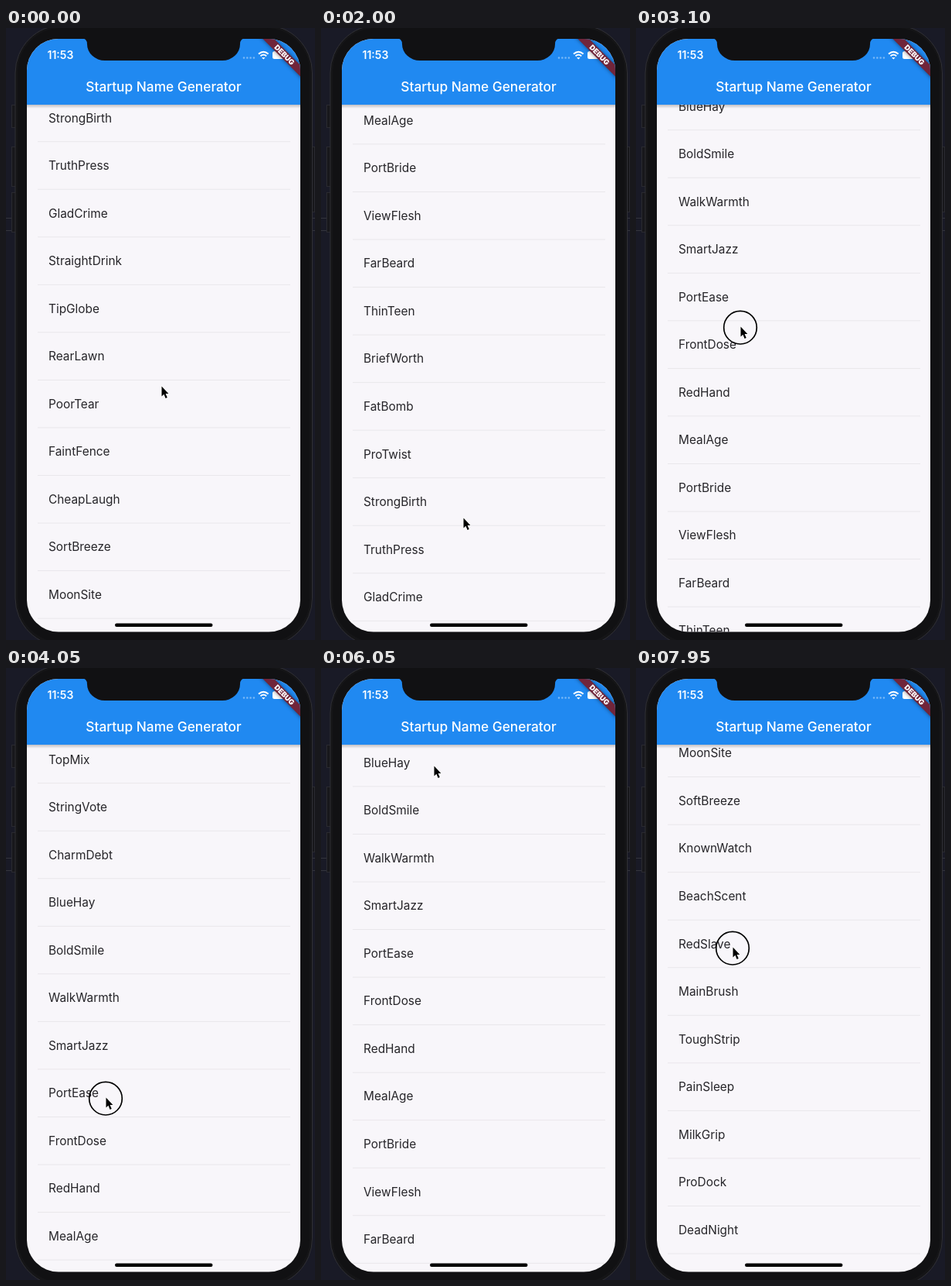
An HTML page for the animation above (8 s loop, 400 by 790 pixels).

```html
<!DOCTYPE html>
<html lang="en">
<head>
<meta charset="utf-8">
<title>Startup Name Generator</title>
<style>
  html, body { margin: 0; width: 100%; height: 100%; overflow: hidden; background: #191a26; }
  svg { display: block; width: 400px; height: 790px; font-family: Inter, Roboto, sans-serif; }
  #rows text { font-size: 15.4px; fill: #262529; }
  #rows path { stroke: #e9e7eb; }
</style>
</head>
<body>
<svg viewBox="0 0 400 790">
  <defs>
    <clipPath id="screen"><rect x="27" y="14" width="354" height="765.5" rx="41"/></clipPath>
    <linearGradient id="shade" x2="0" y2="1">
      <stop stop-color="#000" stop-opacity=".22"/>
      <stop offset="1" stop-color="#000" stop-opacity="0"/>
    </linearGradient>
    <filter id="blur" x="-30%" y="-100%" width="160%" height="300%"><feGaussianBlur stdDeviation="2.5"/></filter>
  </defs>

  <!-- phone body -->
  <path d="M0 245.5H400M0 261.5H400" stroke="#34353d"/>
  <g fill="#17171b" stroke="#2a2a30">
    <rect x="7.5" y="99.5" width="8" height="29"/>
    <rect x="7.5" y="153.5" width="8" height="51"/>
    <rect x="7.5" y="212.5" width="8" height="51"/>
    <rect x="392" y="153.5" width="7.5" height="84"/>
  </g>
  <rect x="12" y="-4" width="384.5" height="802" rx="62" fill="#151517" stroke="#303035"/>
  <rect x="15.5" y="0" width="377.5" height="793" rx="56" fill="#111113"/>

  <g clip-path="url(#screen)">
    <rect x="27" y="14" width="354" height="766" fill="#f8f6fa"/>
    <g id="rows"></g>
    <rect x="27" y="99" width="354" height="5" fill="url(#shade)"/>
    <rect x="27" y="14" width="354" height="85" fill="#2089f1"/>
    <text x="204" y="81.5" text-anchor="middle" font-size="17.3" font-weight="500" fill="#fff">Startup Name Generator</text>
    <text x="53.5" y="40" font-size="14" font-weight="600" fill="#fff">11:53</text>
    <path d="M308 38.5h15" stroke="#fff" stroke-opacity=".4" stroke-width="2.6" stroke-linecap="round" stroke-dasharray="0 4.3"/>
    <g fill="none" stroke="#fff" stroke-width="2">
      <path d="M327 33.5q6.3-5.6 12.6 0M329.5 36.2q3.8-3.3 7.6 0"/>
      <path d="M331 38l2.3 2.4 2.3-2.4z" fill="#fff" stroke="none"/>
    </g>
    <rect x="345" y="30" width="19" height="10" rx="2.5" fill="#fff"/>
    <g transform="translate(381 14) rotate(45)">
      <rect x="-60" y="24" width="120" height="10.3" filter="url(#blur)" opacity=".5"/>
      <rect x="-60" y="24" width="120" height="10.3" fill="#71253a"/>
      <text y="32.4" text-anchor="middle" font-size="9.3" font-weight="900" fill="#fff">DEBUG</text>
    </g>
    <rect x="141" y="768.5" width="126.5" height="4.5" rx="2.25" fill="#050505"/>
  </g>
  <path d="M97 13q8 0 8 8a23 21 0 0 0 23 21h152a23 21 0 0 0 23-21q0-8 8-8z" fill="#111113"/>

  <g id="pointer">
    <circle id="ring" cy="1.7" r="21.3" fill="none" stroke="#000" stroke-width="1.7"/>
    <path d="M.5 .5V13.5L3.4 10.8 5.6 16 7.8 15 5.6 10H9.4z" stroke="#fff" stroke-width="1.6" stroke-linejoin="round" paint-order="stroke"/>
  </g>
</svg>
<script>
const names = `TopMix StringVote CharmDebt BlueHay BoldSmile WalkWarmth SmartJazz PortEase FrontDose
RedHand MealAge PortBride ViewFlesh FarBeard ThinTeen BriefWorth FatBomb ProTwist StrongBirth TruthPress
GladCrime StraightDrink TipGlobe RearLawn PoorTear FaintFence CheapLaugh SortBreeze MoonSite SoftBreeze
KnownWatch BeachScent RedSlave MainBrush ToughStrip PainSleep MilkGrip ProDock DeadNight`.split(/\s+/);
const LOOP = 8000, STEP = 50, PITCH = 61.54;
const $ = id => document.getElementById(id);

$('rows').innerHTML = names.map((name, i) => {
  const y = i * PITCH;
  return `<text x="55" y="${y + 5.5}">${name}</text><path d="M41 ${y + 30.7}H368"/>`;
}).join('');

const linear = p => p;
const smooth = p => p * p * (3 - 2 * p);
const speedUp = p => p * p;
// Friction of a flung list: speed falls to 13.5% every second.
const fling = (p, ms) => (1 - .135 ** (p * ms / 1000)) / (1 - .135 ** (ms / 1000));

// Keys are [time, value, easing used to arrive there].
function track(keys, t) {
  const next = keys.findIndex(k => k[0] > t);
  if (next < 0) return keys[keys.length - 1][1];
  if (!next) return keys[0][1];
  const [t0, v0] = keys[next - 1], [t1, v1, ease = linear] = keys[next];
  return v0 + (v1 - v0) * ease((t - t0) / (t1 - t0), t1 - t0);
}

const scroll = [
  [0, 991.7], [1650, 991.7], [1700, 987], [1900, 599], [3100, 83.6, fling], [3150, 83.6],
  [3900, -118, smooth], [5900, -118], [5950, -82], [6000, -10], [6050, 62.4],
  [6550, 517, fling], [6750, 700, speedUp], [7650, 1613.2, fling]
];
const pointerX = [
  [0, 201], [400, 203, smooth], [1650, 190, smooth], [1900, 184], [2050, 184],
  [3000, 135, smooth], [3150, 135], [3900, 129, smooth], [4250, 129], [5600, 138, smooth],
  [6050, 146], [6500, 125, smooth], [6750, 121], [7600, 125, smooth]
];
const pointerY = [
  [0, 462], [400, 490, smooth], [1500, 231, smooth], [1650, 231], [1700, 236], [1900, 622],
  [2000, 632], [2950, 385, smooth], [3150, 385], [3900, 554, smooth], [4250, 554],
  [5600, 306, smooth], [5900, 306], [5950, 270], [6000, 198], [6050, 126], [6120, 112],
  [6500, 392, smooth], [6550, 392], [6750, 209, speedUp], [6830, 160], [7550, 356, smooth],
  [7650, 356], [7800, 360, smooth]
];
const presses = [[1600, 1900], [3050, 4150], [5750, 6020], [6520, 6740], [7640, 8000]];

function draw() {
  const t = Math.floor(performance.now() % LOOP / STEP) * STEP;
  $('rows').setAttribute('transform', `translate(0 ${-track(scroll, t)})`);
  $('pointer').setAttribute('transform', `translate(${track(pointerX, t)} ${track(pointerY, t)})`);
  $('ring').style.display = presses.some(([from, to]) => t >= from && t < to) ? '' : 'none';
  requestAnimationFrame(draw);
}
draw();
</script>
</body>
</html>
```
